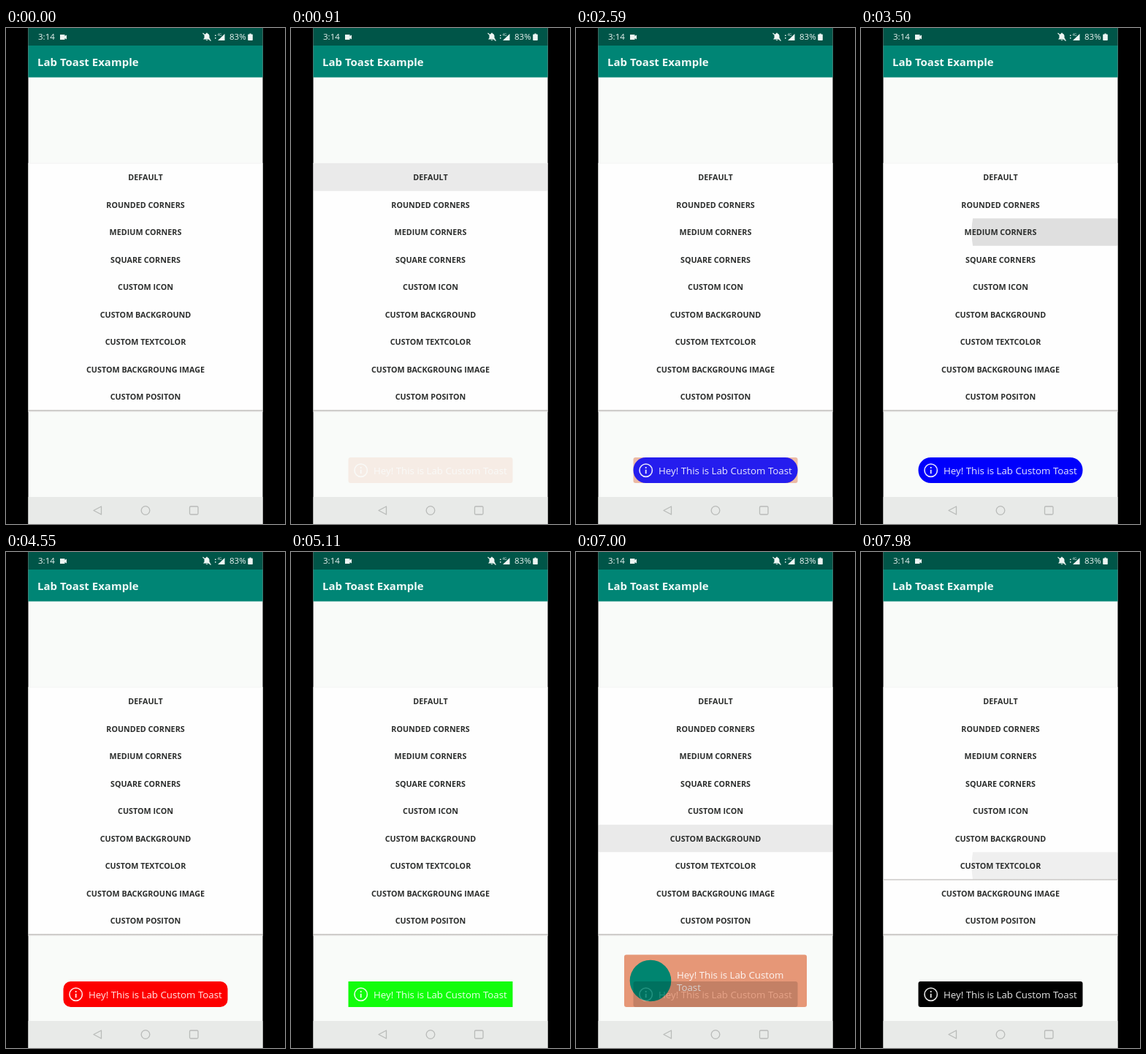
Animation, 382 px wide and 678 px high, one loop 8 s. Source, as an HTML page:

```html
<!DOCTYPE html>
<html lang="en">
<head>
<meta charset="utf-8">
<title>Lab Toast Example</title>
<style>
  html, body { margin: 0; width: 100%; height: 100%; overflow: hidden; background: #000; }
  svg { display: block; width: 100vw; height: 100vh; font-family: "Open Sans", "Noto Sans", sans-serif; }
  .label { font-size: 10.75px; font-weight: 700; fill: #2c2e2d; text-anchor: middle; }
  .toast text { font-size: 13.3px; fill: #fff; fill-opacity: .9; }
</style>
</head>
<body>
<svg viewBox="0 0 382 678">
  <defs>
    <clipPath id="rowClip"><rect id="rowBox" x="30.5" width="321" height="37.5" rx="1.5"/></clipPath>
    <linearGradient id="edge" x1="0" y1="0" x2="0" y2="1">
      <stop offset="0" stop-color="#bdbab8"/>
      <stop offset="1" stop-color="#f4f4f3"/>
    </linearGradient>
  </defs>

  <rect width="382" height="678"/>
  <rect x="30.5" width="321" height="678" fill="#f9fbf9"/>
  <rect x="30.5" width="321" height="24" fill="#005548"/>
  <rect x="30.5" y="24" width="321" height="43.500" fill="#008575"/>
  <text x="43" y="51.8" font-size="15" font-weight="700" fill="#f0faf8">Lab Toast Example</text>

  <g fill="#eef5f3">
    <g font-size="11.5">
      <text x="44" y="16.4">3:14</text>
      <text x="306" y="16.4">83%</text>
    </g>
    <path d="M74 9h6.500v2l2.500-1.500v6l-2.500-1.500v2h-6.500z"/>
    <path d="M270 15.500l1.500-2v-3q.4-2.700 2.600-3v-.7h1.800v.7q2.200.3 2.600 3v3l1.500 2zM273.500 16.300h3q-1.500 1.900-3 0z"/>
    <path d="M269.500 7l11 10.500" fill="none" stroke="#eef5f3" stroke-width="1.100"/>
    <path d="M299.500 8v9h-9.500z"/>
    <rect x="286" y="9.500" width="1.500" height="1.500"/>
    <rect x="286" y="13" width="1.500" height="1.500"/>
    <text x="289.500" y="10.500" font-size="4.500">4G</text>
    <path d="M333.500 7.500h2v1h1.500q.8 0 .8.800v7q0 .8-.8.800h-5q-.8 0-.8-.8v-7q0-.8.8-.8h1.500z"/>
  </g>

  <rect x="30.5" y="185" width="321" height="337.500" fill="#fefefe"/>
  <rect x="30.5" y="184.500" width="321" height="1" fill="#f3f4f3"/>
  <rect x="30.5" y="522" width="321" height="3" fill="url(#edge)"/>

  <g clip-path="url(#rowClip)"><circle id="ripple" cx="264"/></g>
  <rect id="lift" x="30.5" width="321" height="2" fill="url(#edge)"/>
  <g id="labels"></g>
  <g id="toasts"></g>

  <rect x="30.5" y="641" width="321" height="37" fill="#e8eae8"/>
  <g fill="none" stroke="#b9bbb9" stroke-width="1.300" stroke-linejoin="round">
    <path d="M120 659.500l10.500-5.500v11z"/>
    <circle cx="191" cy="659.500" r="5.800"/>
    <rect x="251.500" y="654" width="11.500" height="11" rx="1.500"/>
  </g>
</svg>
<script>
const LOOP = 8000, STEP = 70, ROW = 37.5, FIRST_ROW = 204, FADE = 400;
const labels = ["DEFAULT", "ROUNDED CORNERS", "MEDIUM CORNERS", "SQUARE CORNERS", "CUSTOM ICON",
  "CUSTOM BACKGROUND", "CUSTOM TEXTCOLOR", "CUSTOM BACKGROUNG IMAGE", "CUSTOM POSITON"];

// One press per row, from the top; "show" is when its toast starts to fade in.
const presses = [
  { at: 560, show: 880, color: "#e69777", radius: 3 },
  { at: 2030, show: 2350, color: "#0000fc", radius: 17 },
  { at: 3360, show: 3680, color: "#fd0000", radius: 10 },
  { at: 4620, show: 4700, color: "#12fd0c", radius: 0 },
  { at: 5600, show: 5920, color: "#e69777", radius: 3, large: true },
  { at: 6650, show: 6970, color: "#000", radius: 3 },
  { at: 7980, show: Infinity }
];

const el = id => document.getElementById(id);
const clamp = v => Math.max(0, Math.min(1, v));
const ramp = (t, from, to) => clamp((t - from) / (to - from));
const accelerate = p => p * p;
const decelerate = p => 1 - (1 - p) ** 2;
const set = (node, attrs) => {
  for (const name in attrs) node.setAttribute(name, attrs[name]);
};

function toastMarkup({ color, radius, large }) {
  const body = large
    ? `<rect x="66" y="550.5" width="250" height="71.500" rx="${radius}" fill="${color}"/>
       <circle cx="102" cy="586" r="28.300" fill="#008570"/>
       <text x="138" y="583">Hey! This is Lab Custom</text>
       <text x="138" y="599.500">Toast</text>`
    : `<rect x="78.500" y="587" width="225" height="35" rx="${radius}" fill="${color}"/>
       <circle cx="95.700" cy="604.700" r="8.700" fill="none" stroke="#fff" stroke-opacity=".9" stroke-width="1.600"/>
       <path d="M95.700 600v2M95.700 603.700v5.500" stroke="#fff" stroke-opacity=".9" stroke-width="1.800"/>
       <text x="113" y="609.700">Hey! This is Lab Custom Toast</text>`;
  return `<g class="toast">${body}</g>`;
}

el("labels").innerHTML = labels.map((label, i) =>
  `<text class="label" x="191" y="${FIRST_ROW + i * ROW + 4}">${label}</text>`).join("");
const shown = presses.filter(p => p.color);
el("toasts").innerHTML = shown.map(toastMarkup).join("");
const toasts = [...el("toasts").children];

function drawPress(t) {
  const row = presses.findLastIndex(p => t >= p.at);
  const age = row < 0 ? Infinity : t - presses[row].at;
  const top = FIRST_ROW + (row - .5) * ROW;
  set(el("rowBox"), { y: top });
  set(el("ripple"), {
    cy: top + ROW / 2,
    r: 112.5 + 128 * ramp(age, 140, 280),
    opacity: (.06 + .06 * ramp(age, 0, 140)) * (1 - ramp(age, 280, 490))
  });
  set(el("lift"), { y: top + ROW - .5, opacity: age < STEP ? 1 : 0 });
}

function drawToasts(t) {
  toasts.forEach((toast, i) => {
    const start = shown[i].show;
    const end = i + 1 < shown.length ? shown[i + 1].show : Infinity;
    const leaving = end === Infinity ? 0 : ramp(t, end, end + FADE);
    const entering = ramp(t, start, start + FADE);
    set(toast, { opacity: decelerate(entering) * (1 - accelerate(leaving)) });
  });
}

function draw(now) {
  const t = Math.floor(now % LOOP / STEP) * STEP;
  drawPress(t);
  drawToasts(t);
}

const origin = performance.now();
function tick() {
  draw(performance.now() - origin);
  requestAnimationFrame(tick);
}
tick();
</script>
</body>
</html>
```
